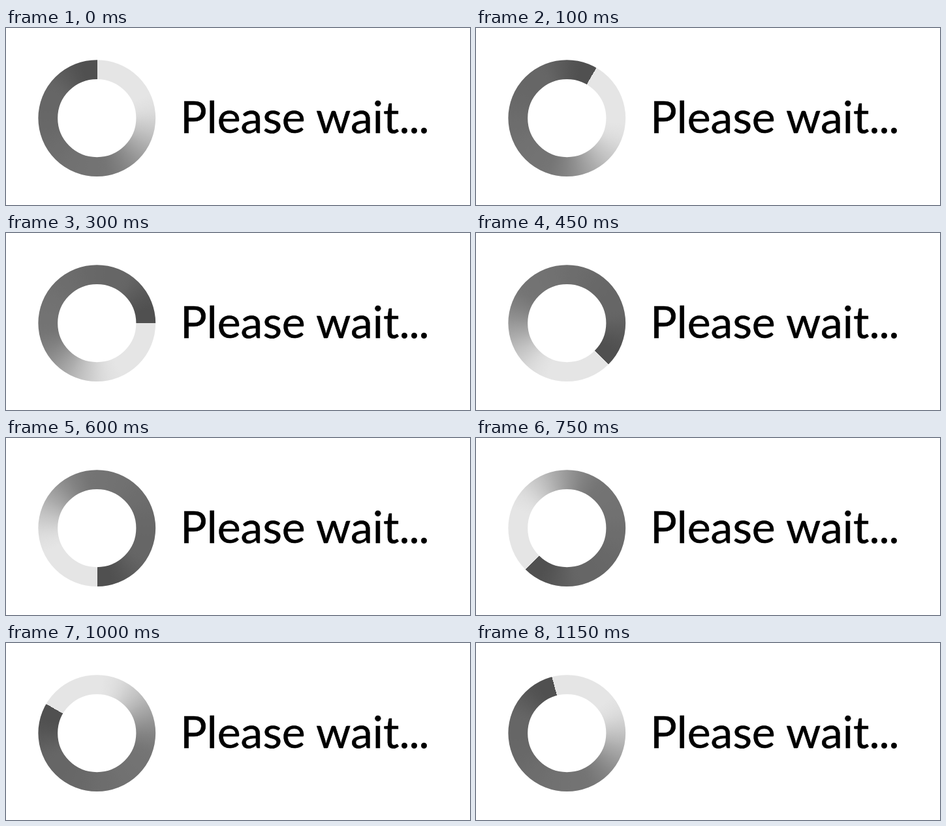
An HTML page with a canvas that plays this animation: 711 px wide and 273 px high, repeating every 1.2 s.

```html
<!DOCTYPE html>
<html lang="en">
<head>
<meta charset="utf-8">
<title>Please wait</title>
<style>
  html, body { margin: 0; width: 100%; height: 100%; overflow: hidden; background: #fff; }
  #stage { position: relative; width: 711px; height: 273px; }
  canvas, svg { position: absolute; left: 0; top: 0; display: block; }
  text { font: 68px Lato, "Open Sans", sans-serif; fill: #000; stroke: #000; stroke-width: 0.5px; }
  .dots { letter-spacing: -1px; }
</style>
</head>
<body>
<div id="stage">
  <canvas id="ring" width="711" height="273"></canvas>
  <svg width="711" height="273" viewBox="0 0 711 273">
    <text x="267" y="162">Please</text>
    <text x="475" y="162">wait<tspan class="dots">...</tspan></text>
  </svg>
</div>
<script>
  const LOOP = 1200, STEPS = 24;
  const CX = 139.3, CY = 139.1, RADIUS = 75, WIDTH = 29.8;
  const SEAM_X = 139.6; // keeps the upright seam on a pixel edge

  const ctx = document.getElementById("ring").getContext("2d");

  function smooth(from, to, x) {
    const t = Math.min(1, Math.max(0, (x - from) / (to - from)));
    return t * t * (3 - 2 * t);
  }

  // Grey level by degrees clockwise from the seam: light, then three soft falls.
  function grey(deg) {
    const g = 229 - 114 * smooth(62, 180, deg)
                  - 13 * smooth(180, 290, deg)
                  - 22 * smooth(298, 348, deg);
    return `rgb(${g}, ${g}, ${g})`;
  }

  function draw(time) {
    const step = Math.floor((time % LOOP) / (LOOP / STEPS));
    const start = (step / STEPS) * 2 * Math.PI - Math.PI / 2;
    const shade = ctx.createConicGradient(start, SEAM_X, CY);
    for (let deg = 0; deg <= 360; deg += 5) shade.addColorStop(deg / 360, grey(deg));

    ctx.clearRect(0, 0, 711, 273);
    ctx.lineWidth = WIDTH;
    ctx.strokeStyle = shade;
    ctx.beginPath();
    ctx.arc(CX, CY, RADIUS, 0, 2 * Math.PI);
    ctx.stroke();
  }

  const begin = performance.now();
  function tick() {
    draw(performance.now() - begin);
    requestAnimationFrame(tick);
  }
  tick();
</script>
</body>
</html>
```
